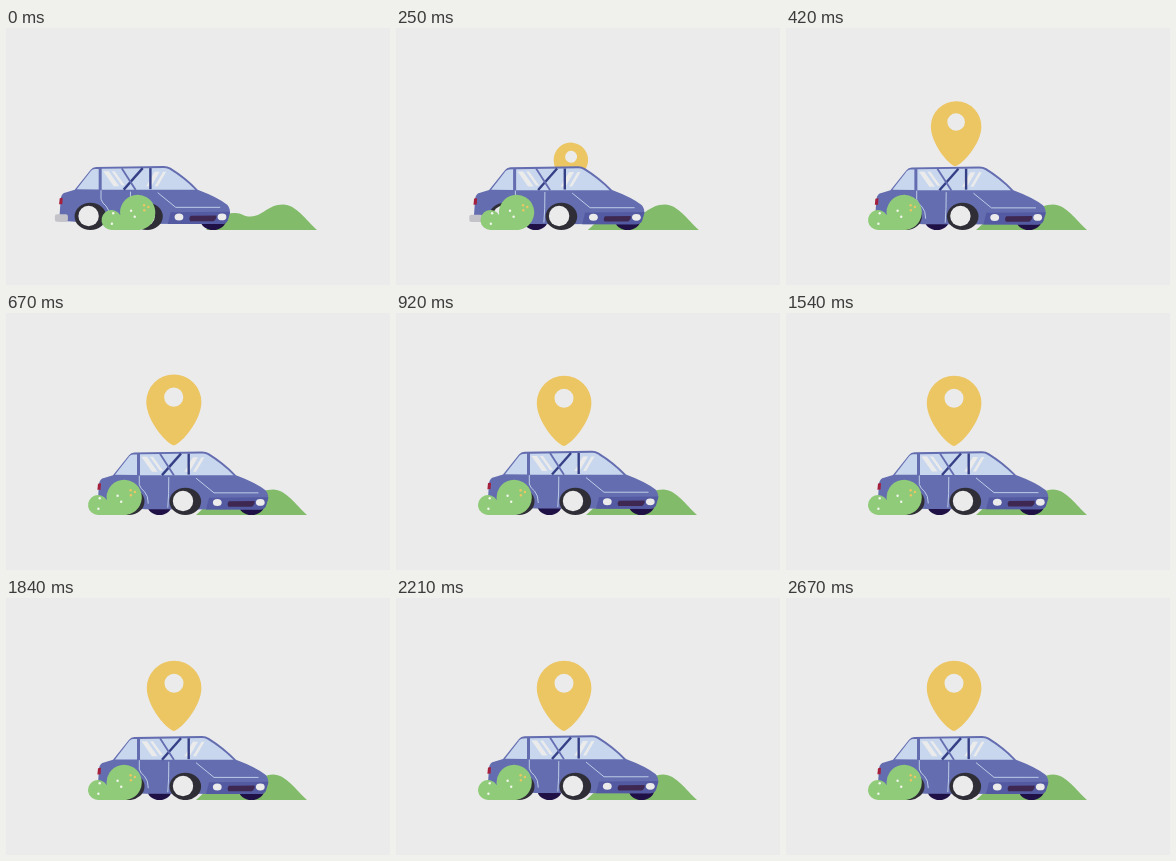
Animation of 384 by 257 pixels, one loop 2750 ms. Source, as an HTML page:

```html
<!DOCTYPE html>
<html lang="en">
<head>
<meta charset="utf-8">
<title>Car and map pin</title>
<style>
  html, body { margin: 0; width: 100%; height: 100%; overflow: hidden; background: #ebebeb; }
  svg { display: block; width: 100%; height: 100%; }
</style>
</head>
<body>
<svg viewBox="0 0 384 257" xmlns="http://www.w3.org/2000/svg">
  <rect width="384" height="257" fill="#ebebeb"/>

  <g id="pin">
    <path fill="#edc664" fill-rule="evenodd" d="M168 133C160 131 140.8 108 140.8 90A27.3 27.3 0 0 1 195.4 90C195.4 108 176 131 168 133Z
      M177.5 85.2a9.5 9.5 0 1 0 -19 0a9.5 9.5 0 1 0 19 0Z"/>
  </g>

  <path id="hill" fill="#82bb69" d="M190 202C200 193 207 185 219 185C226 185 228 189 235 188.5C247 188 252 176.5 267 176.5C280 176.5 290 192 301 202Z"/>

  <g id="car">
    <g fill="#1f1045">
      <ellipse cx="153.5" cy="191.5" rx="12.5" ry="10.5"/>
      <ellipse cx="245.5" cy="191.5" rx="13" ry="10.5"/>
    </g>
    <g id="body">
      <path fill="#646db0" d="M91.5 193L93 170Q94 165 98 164.3L107 161.5L123 141.5Q125 139 128.5 138.8L196 137.8Q200 137.8 203 139.7Q218 149 230 161.5Q250 169 259.5 176.5Q262.5 180 262.3 185L260 192Q258.5 195.8 254 195.8L140 195.5L100 193.2Z"/>
      <rect x="87.2" y="186.2" width="13" height="7.3" rx="2" fill="#c3c3c9"/>
      <path fill="#a5203c" d="M92 170L95 169.6L94.6 176L91.4 176.2Z"/>

      <g fill="#c8d7ee">
        <path d="M109 161.2L123.4 142.6Q124.8 141 127 140.9L131 140.8L131 161.4Z"/>
        <path d="M134 140.7L196 139.8Q199 139.8 201.5 141.2Q216 150 227.5 161.6L134 161.6Z"/>
      </g>
      <g fill="#ebebeb">
        <path d="M135.5 143H141L151.5 158H146Z"/>
        <path d="M144 143H147L157 157H154Z"/>
        <path d="M178.5 158H183.5L192 143.5H187Z"/>
        <path d="M187 158H190L198.5 143.5H195.5Z"/>
      </g>
      <g fill="none" stroke="#353f86" stroke-width="2.4">
        <path d="M156 161.5L175 140"/>
        <path d="M182.7 140V161"/>
      </g>
      <path d="M154 140L168 161.8" fill="none" stroke="#646db0" stroke-width="1.8"/>

      <path fill="#535aa2" d="M203 184L262.3 183.5L260 192Q258.5 195.8 254 195.8H200Z"/>
      <path fill="#3e2852" d="M223 187.6L248.5 187.4Q249.5 190.5 246 193H222.5Q220.5 190 223 187.6Z"/>
      <g fill="#ebebeb">
        <ellipse cx="211.3" cy="188.8" rx="4.4" ry="3.5"/>
        <ellipse cx="254.3" cy="188.8" rx="4.4" ry="3.4"/>
      </g>
      <g fill="none" stroke="#c8d7ee" stroke-width=".9">
        <path d="M190 164.5L208 179.2H252.5"/>
        <path d="M133.3 162V171Q134.5 175 138.5 178Q142.3 182 142.3 190"/>
        <path d="M162.8 163.5L162.6 180L161.8 194"/>
      </g>
    </g>
    <g fill="#2f2e37">
      <ellipse cx="122.7" cy="188.4" rx="15.8" ry="13.7"/>
      <ellipse cx="179.3" cy="188.4" rx="15.8" ry="13.7"/>
    </g>
    <g fill="#ebebeb">
      <circle cx="120.9" cy="188" r="10.2"/>
      <circle cx="177" cy="188" r="10.2"/>
    </g>
  </g>

  <g id="bush">
    <path fill="#8fcb78" d="M92 202A10 10 0 1 1 100.8 187.2A17.6 17.6 0 1 1 124 201L120 202Z"/>
    <g fill="#f3f6ee">
      <circle cx="111.6" cy="182.8" r="1.2"/>
      <circle cx="115.2" cy="188.7" r="1.2"/>
      <circle cx="93.7" cy="185.2" r="1.2"/>
      <circle cx="92.4" cy="195.8" r="1.2"/>
    </g>
    <g fill="#edc664">
      <circle cx="124.6" cy="177.2" r="1.2"/>
      <circle cx="128.9" cy="179" r="1.2"/>
      <circle cx="124.9" cy="182.2" r="1.2"/>
    </g>
  </g>
</svg>
<script>
const LOOP = 2750, STEP = 1000 / 24;
const [pin, hill, car, body, bush] =
  ["pin", "hill", "car", "body", "bush"].map(id => document.getElementById(id));

const progress = (t, start, length) => Math.min(1, Math.max(0, (t - start) / length));
const glide = (u, power) => 1 - (1 - u ** 1.3) ** power;

function backOut(u) {
  const c = 0.56, v = u - 1;
  return 1 + (c + 1) * v ** 3 + c * v * v;
}

const move = (el, x, y = 0) =>
  el.setAttribute("transform", `translate(${x.toFixed(3)} ${y.toFixed(3)})`);

function draw(t) {
  // scenery slides left while the car rolls in
  const scene = 1 - glide(progress(t, 60, 360), 3);
  move(bush, 13.5 * scene);
  move(hill, 10 * scene);
  move(car, -38.3 * (1 - glide(progress(t, 60, 700), 5)));

  // braking dip on top of a slow idle sway
  const sway = 0.45 * Math.cos(2 * Math.PI * (t - 1600) / 1333);
  const dip = 0.8 * Math.exp(-(((t - 700) / 300) ** 2));
  move(body, 0, sway + dip);

  // the pin grows out of the ground behind the car
  const s = Math.max(0, backOut(progress(t, 83, 710)));
  pin.setAttribute("transform",
    `translate(168 202) rotate(${15 * (1 - s)}) scale(${s}) translate(-168 -202)`);
  pin.style.display = s > 0.01 ? "" : "none";
}

const origin = performance.now();
function tick() {
  const t = (performance.now() - origin) % LOOP;
  draw(Math.floor((t + 5) / STEP) % 66 * STEP);
  requestAnimationFrame(tick);
}
tick();
</script>
</body>
</html>
```
